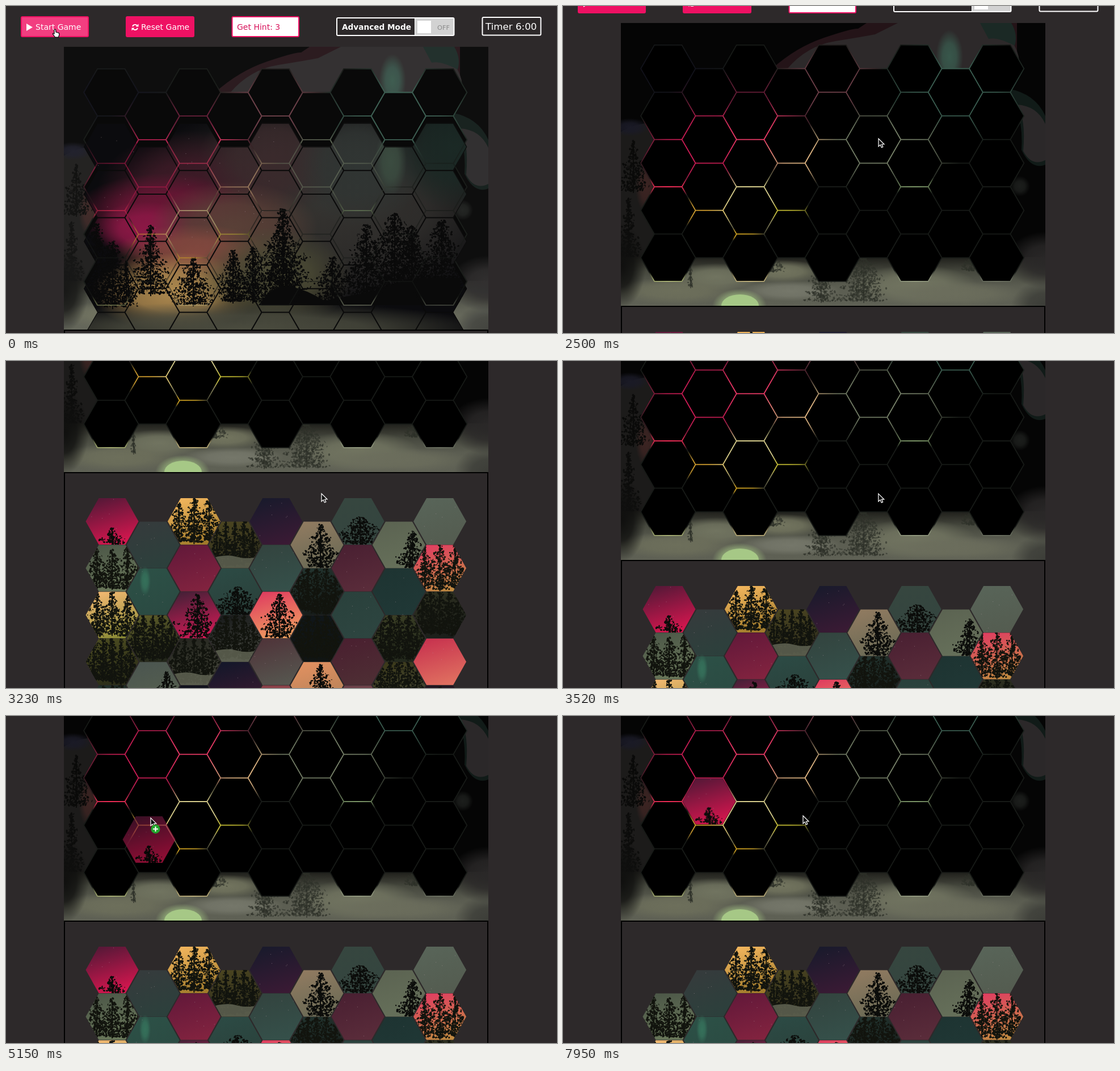
These frames come from a looping animation (971 px wide and 577 px high, 8 s). An HTML page with a canvas:

```html
<!DOCTYPE html>
<html lang="en">
<head>
<meta charset="utf-8">
<title>Hexagon puzzle</title>
<style>
html, body { margin: 0; width: 100%; height: 100%; overflow: hidden; background: #2d292a; }
canvas { display: block; }
</style>
</head>
<body>
<canvas id="stage" width="971" height="577"></canvas>
<script>
const ctx = document.getElementById('stage').getContext('2d');
const PINK = '#ee1163', PAGE = '#2d292a', STEP = 147.1;

let seed = 7;
const rnd = () => (seed = (seed * 16807) % 2147483647) / 2147483647;

function layer(w, h, draw) {
  const cv = document.createElement('canvas');
  cv.width = w;
  cv.height = h;
  draw(cv.getContext('2d'));
  return cv;
}

function hex(path, x, y, rx, flat, ry) {
  path.moveTo(x - rx, y);
  path.lineTo(x - flat, y - ry);
  path.lineTo(x + flat, y - ry);
  path.lineTo(x + rx, y);
  path.lineTo(x + flat, y + ry);
  path.lineTo(x - flat, y + ry);
  path.closePath();
}

function glow(c, x, y, rx, ry, color) {
  c.save();
  c.translate(x, y);
  c.scale(rx, ry);
  const g = c.createRadialGradient(0, 0, 0, 0, 0, 1);
  g.addColorStop(0, color);
  g.addColorStop(0.5, color + 'd0');
  g.addColorStop(1, color + '00');
  c.fillStyle = g;
  c.fillRect(-1, -1, 2, 2);
  c.restore();
}

function shape(c, color, d) {
  c.fillStyle = color;
  c.fill(new Path2D(d));
}

// A pine: trunk plus uneven tiers of small random clumps.
function tree(c, x, y, h, w, color = '#0b0c0a') {
  c.fillStyle = color;
  c.fillRect(x - 1, y - h * 0.95, 2, h * 0.95);
  const tiers = Math.max(3, Math.round(h / 7)), perTier = (20 + h * w / 11) / tiers;
  for (let i = 0; i < tiers; i++) {
    const spread = w * 0.65 * (0.55 + rnd() * 0.55);
    for (let j = 0; j < perTier * (0.3 + 1.4 * i / tiers); j++) {
      const k = (i + rnd() * 0.9) / tiers;
      const dx = (rnd() + rnd() - 1) * spread * (0.12 + 0.88 * Math.min(1, k * 1.7));
      c.beginPath();
      c.ellipse(x + dx, y - h * (1 - k * 0.97), 0.6 + rnd() * 2.2, 0.5 + rnd() * 1.5, rnd() * 3, 0, 7);
      c.fill();
    }
  }
}

function stars(c, x, y, w, h, n) {
  c.fillStyle = '#b9a0a880';
  while (n--) c.fillRect(x + rnd() * w, y + rnd() * h, 1, 1);
}

// Board slots: nine columns, alternately five and four high.
const slots = new Path2D();
for (let col = 0; col < 9; col++)
  for (let row = 0; row < 5 - col % 2; row++)
    hex(slots, 185.3 + col * 72.35, 152.5 + col % 2 * 41.7 + row * 83.4, 48.2, 24.2, 41.7);

const lines = layer(971, 577, c => {
  c.strokeStyle = '#171a17';
  c.lineWidth = 1.8;
  c.stroke(slots);
  c.globalCompositeOperation = 'source-atop';
  [[180, 160, 130, 60, '#10101a'], [330, 210, 150, 60, '#6a1c38'],
   [470, 180, 110, 75, '#74424c'], [690, 190, 150, 100, '#3f6658'],
   [560, 290, 150, 80, '#7f8a70'], [620, 358, 45, 20, '#7f9a6a'],
   [240, 290, 120, 90, '#dc1c5a'], [350, 270, 95, 65, '#f43c6a'],
   [185, 361, 55, 18, '#f02c56'], [420, 305, 75, 55, '#eec08a'],
   [250, 405, 60, 30, '#e0a830'], [330, 388, 78, 66, '#f8eca0'],
   [395, 405, 45, 22, '#c8c030'], [315, 445, 40, 12, '#d8a820'],
   [185, 528, 55, 20, '#b0b878'], [330, 528, 65, 22, '#c8b880'],
   [620, 528, 75, 22, '#989f84'], [764, 528, 60, 20, '#6f7464']]
    .forEach(a => glow(c, ...a));
});

const board = layer(971, 571, c => {
  c.beginPath();
  c.rect(102, 72, 748, 499);
  c.clip();
  c.fillStyle = '#050505';
  c.fillRect(102, 72, 748, 499);
  shape(c, '#241418', 'M368 153Q410 115 460 98T520 82L535 72H800V153Z');
  shape(c, PAGE, 'M395 153Q430 112 480 104T550 92L590 72H740Q748 95 775 98T806 153Z');
  shape(c, '#1b2925', 'M735 72H790Q802 92 796 112Q765 96 750 100Z');
  glow(c, 681, 132, 24, 48, '#38574b');
  shape(c, '#111b18', 'M784 188Q832 196 850 236V322Q825 332 808 296Q812 235 784 188Z');
  shape(c, '#2b2829', 'M800 216Q835 218 850 250V314Q826 326 811 298Q816 240 800 216Z');
  glow(c, 805, 360, 18, 18, '#1c1e1c');
  shape(c, '#1c1b1a', 'M102 264Q138 244 170 250V571H102Z');
  glow(c, 118, 256, 34, 16, '#1a1a26');
  glow(c, 146, 362, 18, 44, '#3c2422');
  tree(c, 124, 372, 92, 40, '#0b0b0a');
  tree(c, 116, 545, 165, 40, '#0d0d0c');

  const g = c.createLinearGradient(0, 484, 0, 571);
  g.addColorStop(0, '#1d1d19');
  g.addColorStop(0.3, '#45473d');
  g.addColorStop(0.6, '#5b5d51');
  g.addColorStop(1, '#5f6155');
  c.fillStyle = g;
  c.fillRect(102, 485, 748, 86);
  [[385, 510, 75, 20, '#73755f'], [270, 520, 80, 24, '#717460'],
   [620, 535, 110, 36, '#717460'], [200, 545, 110, 24, '#6d6f5b'],
   [400, 545, 90, 18, '#75776a'], [690, 550, 130, 22, '#6b6d5c'],
   [102, 500, 44, 75, '#0f0f0e'], [850, 490, 70, 50, '#2a2828'],
   [850, 571, 60, 45, '#3c3d38']].forEach(a => glow(c, ...a));
  [[225, 540, 55, 9], [370, 512, 28, 50], [455, 566, 74, 52],
   [530, 566, 86, 82], [720, 510, 25, 44]].forEach(a => tree(c, ...a, '#2f312aa0'));
  glow(c, 311, 571, 48, 30, '#a6c886');
  c.fillStyle = '#a6c886';
  c.beginPath();
  c.ellipse(312, 571, 33, 20, 0, 0, 7);
  c.fill();

  c.fillStyle = '#000';
  c.fill(slots);
  c.drawImage(lines, 0, 0);
});

// The assembled pieces as they drop off the board.
const pieces = layer(971, 640, c => {
  const moved = new Path2D();
  moved.addPath(slots, new DOMMatrix([1, 0, 0, 1, 0, 96]));
  c.clip(moved);
  c.fillStyle = '#0b0b0e';
  c.fillRect(0, 0, 971, 640);
  [[560, 350, 360, 190, '#353330'], [330, 330, 170, 110, '#3f1a27'],
   [470, 270, 130, 100, '#3a2a2c'], [620, 280, 120, 110, '#303533'],
   [790, 250, 110, 110, '#1b2925'], [678, 275, 28, 60, '#3b4c40'],
   [280, 365, 160, 70, '#6a1535'], [245, 395, 90, 50, '#8c1846'],
   [400, 390, 150, 80, '#594037'], [330, 440, 140, 55, '#85493f'],
   [300, 505, 150, 70, '#b08b50'], [470, 480, 140, 90, '#4c4b35'],
   [420, 570, 430, 48, '#4b4c3f']].forEach(a => glow(c, ...a));
  stars(c, 140, 210, 350, 200, 45);
  [[160, 525, 140, 70], [188, 535, 120, 70], [212, 525, 75, 36], [255, 512, 125, 58],
   [330, 530, 85, 72], [400, 525, 95, 64], [435, 525, 100, 60], [488, 528, 170, 84],
   [488, 528, 120, 70], [575, 528, 85, 70], [635, 526, 140, 80], [685, 528, 162, 116],
   [715, 528, 140, 90], [768, 528, 150, 100]].forEach(a => tree(c, ...a, '#0a0a0a'));
  shape(c, '#0a0a0a', 'M445 528Q470 490 500 495T560 520L640 505L720 480H800V528Z');
  c.strokeStyle = '#0a0a0a';
  c.lineWidth = 2;
  c.stroke(moved);
});

// One piece: sky colours from top to bottom and a kind of trees.
function piece(c, x, y, spec) {
  const [top, low, kind] = spec.split(' ');
  const path = new Path2D();
  hex(path, x, y, 46.5, 23.5, 41);
  c.save();
  c.clip(path);
  const g = c.createLinearGradient(x - 12, y - 41, x + 12, y + 41);
  g.addColorStop(0, '#' + top);
  g.addColorStop(1, '#' + low);
  c.fillStyle = g;
  c.fillRect(x - 47, y - 42, 94, 84);
  const base = y + 42;
  const row = (n, h, w) => {
    for (let i = 0; i < n; i++)
      tree(c, x - 40 + 80 * (i + 0.5) / n, base - rnd() * 8, h - rnd() * 16, w, '#12140e');
  };
  if (kind === '-') stars(c, x - 40, y - 40, 80, 80, 6);
  if (kind === 't') { stars(c, x - 40, y - 40, 80, 60, 6); tree(c, x, base, 31, 38); }
  if (kind === 'T') tree(c, x + 6, base, 78, 60);
  if (kind === 'b') tree(c, x + 4, base, 50, 92);
  if (kind === 'r') tree(c, x + 24, base, 66, 52);
  if (kind === 'f') row(3, 86, 40);
  if (kind === 'F') row(5, 96, 36);
  if (kind === 's') {
    row(5, 96, 30);
    c.globalAlpha = 0.85;
    shape(c, '#606353', `M${x - 47} ${y + 25}q30 -10 50 -4t44 -2v30h-94z`);
  }
  c.restore();
}

const tray = [
  ['', '4d5848 6a785a f', 'f0b870 8a8a35 f', '4a4a20 2a2c18 F', '20302a 182018 F'],
  ['353b3c 2c403c -', '2c5046 2b4a42 -', '5a5a28 22261a F', '4c5650 56604e r'],
  ['f0b45c a07a2a f', '64193a 82233f -', '4a2038 d01a55 T', '25261f 45473b s', '10111c 181822 -'],
  ['4a4420 2a2a1c s', '2c4a44 2a403a b', '1a1c1c 45473f s', '15172a 3c1a30 -'],
  ['1a1a2c 3a1a34 -', '33443f 35504a -', 'e0405f f0a060 T', '4f353a 56564f -', '8a4048 a45550 -'],
  ['8f7a60 6a6a55 T', '22332e 151a18 F', '10161a 101412 F', 'e09060 b08058 T'],
  ['36463f 34453f b', '4a2032 5a2c3a -', '2a413c 2d4540 -', '4a2030 4e2e34 -', '6a4048 904a50 -'],
  ['5c6452 66705a r', '1e3432 203836 -', '3a3e24 22281c F', '3c3a1a 45483b s'],
  ['586458 545c50 -', 'e04060 c08a40 f', '2e3020 1a1d1a F', 'c8344f e07060 -', '201620 2a1a22 f']
];

const trayLayer = layer(971, 500, c => {
  c.strokeStyle = '#000';
  c.lineWidth = 2;
  c.strokeRect(103, 1, 746, 498);
  tray.forEach((col, i) => col.forEach((spec, j) => {
    if (spec) piece(c, 187 + i * 72.2, 87 + i % 2 * 41.5 + j * 82.6, spec);
  }));
  glow(c, 245, 192, 10, 26, '#35705a');
});
const loose = layer(94, 84, c => piece(c, 47, 42, '5a1838 d8164f t'));

function box(x, y, w, h, fill, line, lw = 2) {
  ctx.beginPath();
  ctx.roundRect(x + lw / 2, y + lw / 2, w - lw, h - lw, 2);
  if (fill) { ctx.fillStyle = fill; ctx.fill(); }
  ctx.strokeStyle = line;
  ctx.lineWidth = lw;
  ctx.stroke();
}

function label(s, x, y, size, color = '#fff', weight = '') {
  ctx.font = `${weight} ${size}px "DejaVu Sans", sans-serif`;
  ctx.fillStyle = color;
  ctx.fillText(s, x, y);
}

function header(t) {
  box(26, 18, 120, 37, t < 1000 ? '#f23e80' : PINK, PINK);
  shape(ctx, '#fff', 'M36 31L47 37.5L36 44Z');
  label('Start Game', 52, 42, 14);

  box(211, 18, 121, 37, PINK, PINK);
  ctx.strokeStyle = '#fff';
  ctx.lineWidth = 2;
  for (const a of [0.3, 3.44]) {
    ctx.beginPath();
    ctx.arc(227.5, 37.5, 4.6, a, a + 2.4);
    ctx.stroke();
  }
  shape(ctx, '#fff', 'M233.5 31.5v5h-5zM221.5 43.5v-5h5z');
  label('Reset Game', 238, 42, 14);

  box(397.5, 18, 119.5, 37, '#fff', PINK);
  label('Get Hint: 3', 407, 42, 14, '#d8145c');

  ctx.fillStyle = '#d2d2d2';
  ctx.fillRect(720, 21, 69, 31);
  ctx.fillStyle = '#fff';
  ctx.fillRect(725, 26, 24, 22);
  ctx.fillRect(720, 21, 1, 31);
  box(582, 20, 208.5, 33, null, '#fff');
  label('Advanced Mode', 592, 42, 13.65, '#fff', 'bold');
  label('OFF', 760, 41.5, 11.3, '#8a8a8a');

  box(838.5, 19, 105, 33.5, null, '#fff');
  label('Timer ' + (t < 735 ? '6:00' : t < 1760 ? '5:59' : '5:58'), 845, 42, 16.7);
}

const scrollKeys = [[2353, 0], [2500, 41], [2648, 190], [2795, 335], [2941, 417], [3089, 420],
  [3236, 375], [3383, 285], [3530, 220], [3972, 210]];
const mouseKeys = [[588, 85, 41], [882, 88, 43], [1030, 125, 58], [1765, 480, 190],
  [2059, 556, 234], [3530, 556, 234], [4266, 190, 409], [4413, 190, 409], [4560, 222, 375],
  [5148, 255, 180], [5590, 260, 124], [5737, 261, 136], [5884, 261, 148], [6040, 261, 148],
  [6325, 230, 240], [6620, 285, 472], [6914, 398, 430], [7208, 330, 357],
  [7355, 360, 290], [7650, 442, 124], [7943, 423, 176]];

function at(keys, t) {
  let i = 0;
  while (i < keys.length && keys[i][0] <= t) i++;
  if (!i) return keys[0].slice(1);
  const a = keys[i - 1], b = keys[i];
  if (!b) return a.slice(1);
  const k = (t - a[0]) / (b[0] - a[0]);
  return a.slice(1).map((v, j) => v + (b[j + 1] - v) * k);
}

function cursor(x, y, hand) {
  const p = new Path2D(hand
    ? 'M0 1Q1.5 -1 2.6 1L3 5L8 6.5Q9.5 7.5 8.5 11L7.5 14H1.5L-2.5 8.5Q-3 6.5 0 8Z'
    : 'M0 0V13.8L3.2 10.9L5.4 15.8L7.8 14.8L5.7 10H10Z');
  ctx.save();
  ctx.translate(x, y);
  ctx.fillStyle = hand ? '#fff' : '#0c0c0c';
  ctx.strokeStyle = hand ? '#000' : '#fff';
  ctx.lineWidth = 1.2;
  ctx.fill(p);
  ctx.stroke(p);
  ctx.restore();
}

function draw(time) {
  const n = Math.floor((time + 12) / STEP), t = n * STEP;
  const [scroll] = at(scrollKeys, t);
  const [mx, my] = at(mouseKeys, t);
  const dropped = t > 5730, drag = t > 4550 && !dropped;

  ctx.fillStyle = PAGE;
  ctx.fillRect(0, 0, 971, 577);
  ctx.save();
  ctx.translate(0, -Math.round(scroll));
  header(t);
  ctx.drawImage(board, 0, 0);
  if (n < 3) {
    ctx.save();
    ctx.beginPath();
    ctx.rect(102, 72, 748, 499);
    ctx.clip();
    ctx.globalAlpha = [1, 0.6, 0.28][n];
    ctx.fillStyle = '#ffffff09';
    ctx.fillRect(102, 72, 748, 499);
    ctx.drawImage(pieces, 0, n * 80);
    ctx.globalAlpha = 0.55;
    ctx.drawImage(lines, 0, 0);
    ctx.restore();
  }
  ctx.drawImage(trayLayer, 0, 571);
  if (dropped) ctx.drawImage(loose, 210, 319, 95, 83);
  else ctx.drawImage(loose, 140, 616);
  ctx.restore();

  if (drag) {
    ctx.globalAlpha = 0.68;
    ctx.drawImage(loose, mx - 50, my - 4);
    ctx.globalAlpha = 1;
  }
  cursor(mx, my, t < 1000);
  if (drag && my < 320) {
    ctx.fillStyle = '#22a52c';
    ctx.beginPath();
    ctx.arc(mx + 8.5, my + 19.5, 8, 0, 7);
    ctx.fill();
    ctx.fillStyle = '#fff';
    ctx.fillRect(mx + 4, my + 18.5, 9, 2);
    ctx.fillRect(mx + 7.5, my + 15, 2, 9);
  }
}

function loop() {
  draw(performance.now() % 8000);
  requestAnimationFrame(loop);
}
loop();
</script>
</body>
</html>
```
